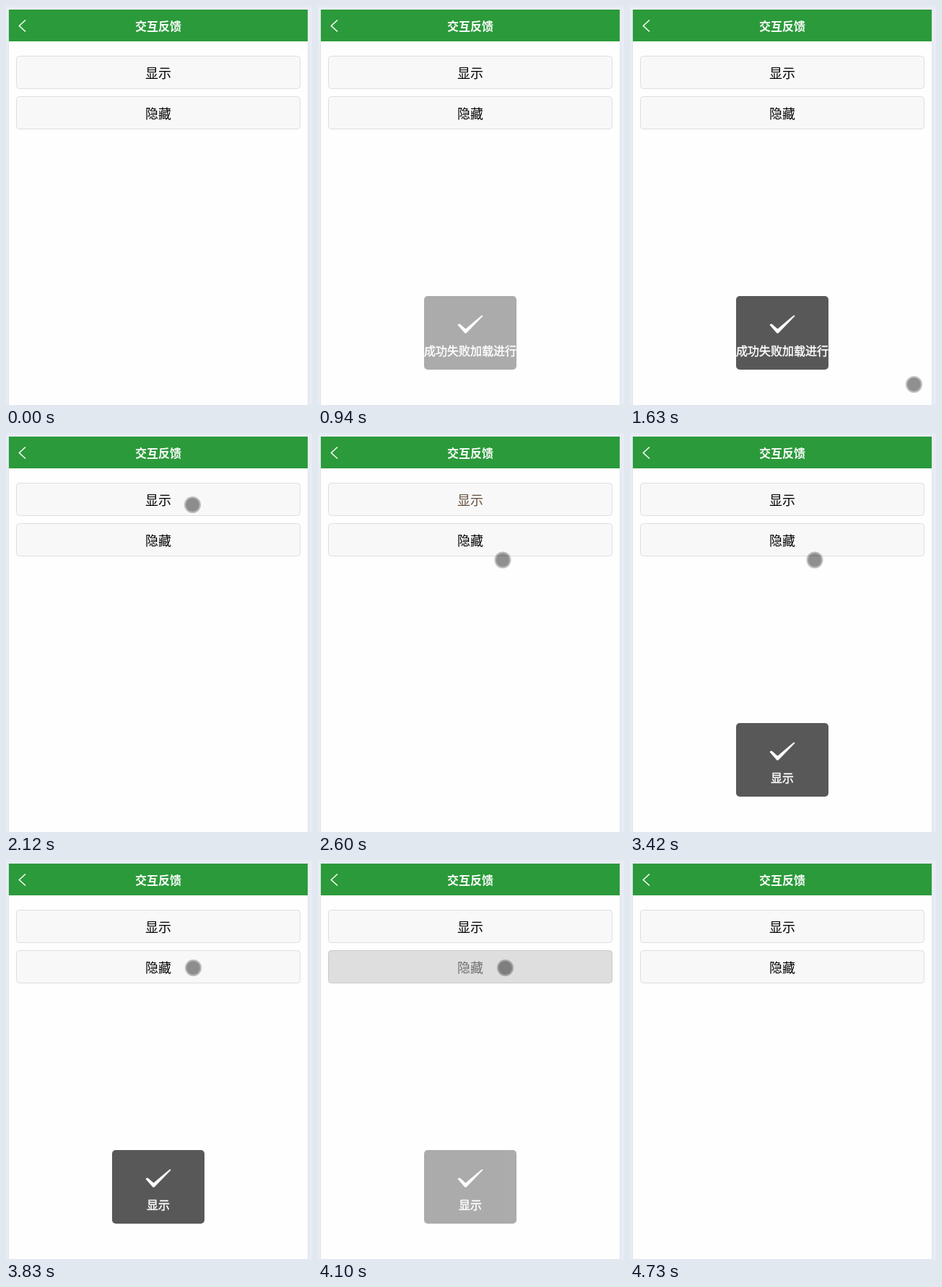
Animation, 424 px wide and 553 px high, one loop 5060 ms. Source, as an HTML page:

```html
<!DOCTYPE html>
<html lang="zh-CN">
<head>
<meta charset="utf-8">
<title>交互反馈</title>
<style>
html, body { margin: 0; width: 100%; height: 100%; overflow: hidden; background: #e8ecf4; }
svg { display: block; width: 424px; height: 553px; }
text { font-family: "Noto Sans CJK SC", "Noto Sans CJK", sans-serif; text-anchor: middle; }
.button rect { fill: #f8f8f8; stroke: #dddee3; }
.button text { font-size: 18px; fill: #000; }
.button.down rect { fill: #dedede; stroke: #c9c9c9; }
.button.down text { fill: #6f6f6f; }
.button.released text { fill: #66503f; }
#message { font-size: 16px; fill: #fff; stroke: #fff; stroke-width: .45; }
</style>
</head>
<body>
<svg viewBox="0 0 424 553">
  <rect width="424" height="553" fill="#e8ecf4"/>
  <rect x="3" y="5" width="416" height="548" fill="#dfe3ea"/>
  <rect x="4" y="5" width="414" height="548" fill="#fefefe"/>
  <rect x="4" y="5" width="414" height="44" fill="#2b9a3a"/>
  <path d="M27 19.500L18.300 27.500L27 35.500" fill="none" stroke="#fff" stroke-width="1.500"/>
  <text x="211" y="34" font-size="16" font-weight="700" fill="#fff">交互反馈</text>
  <g class="button" id="show">
    <rect x="14.5" y="69.5" width="393" height="45" rx="4"/>
    <text x="211" y="100">显示</text>
  </g>
  <g class="button" id="hide">
    <rect x="14.5" y="125.5" width="393" height="45" rx="4"/>
    <text x="211" y="156">隐藏</text>
  </g>
  <g id="toast">
    <rect x="147" y="402" width="128" height="102" rx="5" fill="#000" fill-opacity=".65"/>
    <path d="M193.500 442Q195 439.500 197 441L204.500 447.500L226.500 429Q228 428 228.500 429.800L206 453Q204.500 454.500 203 453Z" fill="#fff"/>
    <text id="message" x="211" y="484"></text>
  </g>
  <g id="pointer">
    <circle r="11.5" fill="#000" fill-opacity=".25"/>
    <circle r="9.4" fill="#000" fill-opacity=".24"/>
  </g>
</svg>
<script>
const LOOP = 5060, TICK = 70;
// Screen refreshes run every TICK ms from each of these times.
const anchors = [0, 940, 1630, 2600, 2960, 3420, 3900, 4030];

const linear = k => k;
const easeOut = k => k * (2 - k);
const smooth = k => k * k * (3 - 2 * k);
const lateSmooth = k => smooth(k) ** 1.3;

const entry = { x: 407, y: 526, at: 1150 }, exit = 4730;
const moves = [
  { from: 1150, to: 1430, x: 393.5, y: 524.5, easeX: easeOut, easeY: easeOut },
  { from: 1700, to: 2120, x: 258.5, y: 99.5, easeX: lateSmooth, easeY: lateSmooth },
  { from: 2400, to: 2600, x: 256, y: 176, easeX: smooth, easeY: smooth },
  { from: 3420, to: 3560, x: 257, y: 190, easeX: smooth, easeY: smooth },
  { from: 3560, to: 3770, x: 259.5, y: 149.5, easeX: smooth, easeY: smooth },
  { from: 4310, to: 4660, x: 421, y: 545, easeX: easeOut, easeY: linear }
];
const toasts = [
  { text: "成功失败加载进行", from: 905, to: 1880 },
  { text: "显示", from: 2705, to: 4000 }
];
const FADE_IN = 70, FADE_OUT = 200;

const el = id => document.getElementById(id);
const clamp = v => Math.max(0, Math.min(1, v));
const within = (t, a, b) => t >= a && t < b;

function tick(t) {
  const start = anchors.filter(a => a <= t).pop();
  return start + Math.floor((t - start) / TICK) * TICK;
}

function pointerAt(t) {
  let { x, y } = entry;
  for (const m of moves) {
    const k = clamp((t - m.from) / (m.to - m.from));
    x += (m.x - x) * m.easeX(k);
    y += (m.y - y) * m.easeY(k);
  }
  return [x, y];
}

function drawToast(t) {
  const toast = toasts.find(o => within(t, o.from, o.to + FADE_OUT));
  el("toast").style.display = toast ? "" : "none";
  if (!toast) return;
  const rise = (t - toast.from) / FADE_IN;
  const fall = (toast.to + FADE_OUT - t) / FADE_OUT;
  el("toast").setAttribute("opacity", clamp(Math.min(rise, fall)));
  el("message").textContent = toast.text;
}

function draw(time) {
  const t = tick(time);
  drawToast(t);
  el("show").classList.toggle("down", within(t, 2260, 2530));
  el("show").classList.toggle("released", within(t, 2530, 2740));
  el("hide").classList.toggle("down", within(t, 3840, 4240));
  el("pointer").style.display = within(t, entry.at, exit) ? "" : "none";
  el("pointer").setAttribute("transform", `translate(${pointerAt(t)})`);
}

const begin = performance.now();
function run() {
  draw((performance.now() - begin) % LOOP);
  requestAnimationFrame(run);
}
run();
</script>
</body>
</html>
```
